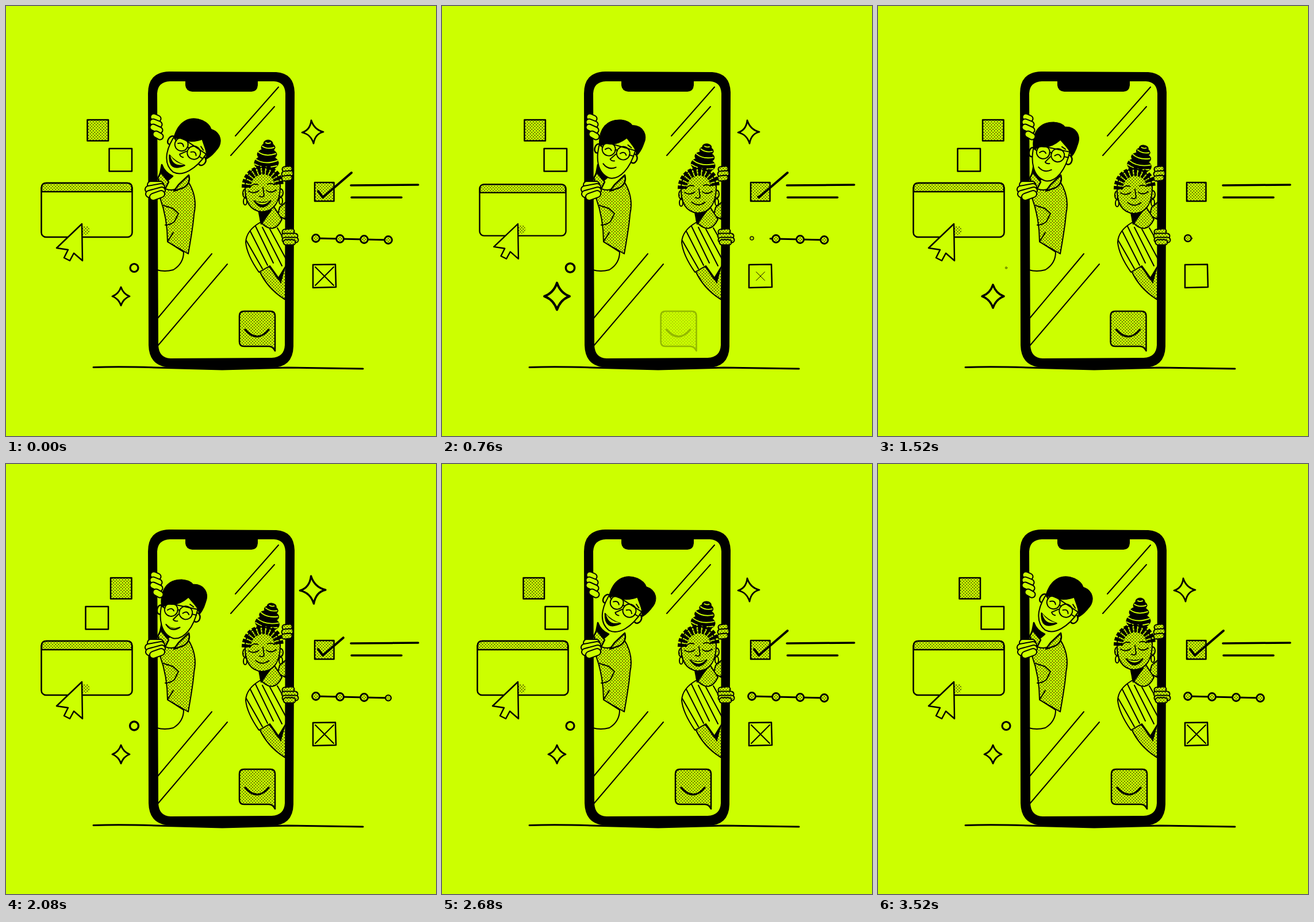
These frames come from a looping animation (748 by 748 pixels, 3.56 s). An HTML page:

```html
<!DOCTYPE html>
<html lang="en">
<head>
<meta charset="utf-8">
<title>Phone friends</title>
<style>
  html, body { margin: 0; height: 100%; overflow: hidden; background: #cf0; }
  svg { display: block; width: 100vw; height: 100vh; }
  .ink { fill: #cf0; stroke: #000; stroke-width: 2.5; stroke-linejoin: round; stroke-linecap: round; }
  .line { fill: none; }
  .solid { fill: #000; }
  .tone { fill: url(#dots); }
  .bare { stroke: none; }
</style>
</head>
<body>
<svg viewBox="0 0 748 748">
  <defs>
    <pattern id="dots" width="3.7" height="3.7" patternUnits="userSpaceOnUse" patternTransform="rotate(45)">
      <rect width="3.7" height="3.7" fill="#cf0"/>
      <circle cx="1.85" cy="1.85" r=".85"/>
    </pattern>
  </defs>
  <g class="ink">
    <!-- window, cursor and squares -->
    <g id="window">
      <rect x="61.5" y="308" width="158" height="94" rx="8"/>
      <path class="tone" d="M62 323V316Q62 308 70 308H211Q219 308 219 316V323Z"/>
      <path class="tone bare" d="M132 383H143L146 390L143 398H132Z"/>
    </g>
    <path id="cursor" d="M132 379L88 421L108 424L101 438L111 443L118 430L133 443Z"/>
    <rect id="tonedSquare" class="tone" x="141.5" y="198" width="36.5" height="36.5"/>
    <rect id="plainSquare" x="179.5" y="248" width="39.5" height="39.5"/>
    <circle id="ring" r="7" stroke-width="3.2"/>
    <path id="lowSpark" stroke-width="2.8" d="M0-16Q4-4 15 0Q4 4 0 16Q-4 4-15 0Q-4-4 0-16Z"/>
    <path id="highSpark" stroke-width="2.8" d="M-2-20Q3-4 19 0Q5 3 2 20Q-3 4-18 1Q-4-3-2-20Z"/>

    <!-- checklist, slider and crossed box -->
    <rect class="tone" x="537" y="307" width="33.5" height="32.5"/>
    <path id="check" class="line" pathLength="1" stroke-width="4" d="M543 322L551 333L601 290"/>
    <path class="line" stroke-width="3.5" d="M600 312L717 311M601 333H688"/>
    <path id="slider" class="line" pathLength="1" stroke-width="2.8" d="M539 404L665 407"/>
    <g id="knobs" stroke-width="2.8"></g>
    <path d="M534 450L573 449.5L574 489L534 490Z"/>
    <path id="cross" class="line" stroke-width="2" d="M-16-16L16 16M16-16L-16 16"/>

    <!-- screen -->
    <path class="line" stroke-width="2" d="M474 141L399 226M467 175L391 260M358 431L264 543M385 449L264 591"/>
    <g id="bubble">
      <path class="tone" d="M414 531H460Q468 531 468 539V600Q464 592 457 592H414Q406 592 406 584V539Q406 531 414 531Z"/>
      <path class="line" stroke-width="3.5" d="M416 563Q437 587 457 563"/>
    </g>

    <!-- man -->
    <path stroke-width="2" d="M281 410L309 428Q309 448 291 459Q276 463 262 459V338"/>
    <path class="tone" stroke-width="2" d="M274 316Q292 328 316 304Q334 332 327 362Q326 380 317 431L281 410Q281 370 268 334Z"/>
    <path class="line" stroke-width="2" d="M281 410L291 394M274 347L290 352L300 361L293 375Q286 381 277 381"/>
    <path class="bare" d="M274 276L276 314Q293 326 312 296Z"/>
    <path class="solid" d="M271 276Q276 290 290 296L276 308L268 292Z"/>
    <path class="tone" d="M269 289L264 300L275 322L283 306ZM292 322L300 311L318 294Q322 308 309 316Z"/>
    <g id="manHead">
      <ellipse cx="-32" cy="4" rx="5" ry="8"/>
      <ellipse cx="33" cy="4" rx="6" ry="8"/>
      <path stroke-width="2" d="M-31-10C-32 20-22 46 2 48C20 46 32 22 32-10Z"/>
      <path class="solid" stroke-width="1" d="M-31-3C-40-30-30-50-6-55Q8-57 15-51C34-56 46-42 43-25Q42-10 36-1Q35-10 24-18L12-27Q0-11-14-9Q-24-8-27-2Z"/>
      <path class="line" stroke-width="1.9" d="M-2-1Q0-4 2-1M24 0L32 0M-24 0L-29-2M-19 2Q-13-5-8 1M8 2Q14-5 19 2M1 5L-6 16Q-3 19 2 17M17-16L24-13"/>
      <circle class="line" stroke-width="1.9" cx="-13" r="11.5"/>
      <circle class="line" stroke-width="1.9" cx="13" r="11.5"/>
      <path id="manMouth" class="solid" stroke-width="2"/>
      <path id="manTeeth" class="bare"/>
    </g>

    <!-- woman -->
    <path class="tone" stroke-width="2" d="M476 350L488 340V368L470 374Z"/>
    <path class="tone" stroke-width="2" d="M441 461Q455 492 486 511L488 448L474 476L458 453Z"/>
    <path class="solid" stroke-width="1" d="M473 473L486 452L478 482Z"/>
    <path stroke-width="2" d="M443 376Q418 390 417 411Q419 433 440 463L459 452L474 473L488 450V372L478 367Q468 386 443 376Z"/>
    <path class="line" stroke-width="2" d="M434 383L465 447M425 392L455 451M418 408L446 457M446 385L480 452M459 388L487 440M472 386L488 414"/>
    <path class="tone" stroke-width="2" d="M441 350L443 376Q466 400 480 371L464 346Z"/>
    <path class="solid" d="M439 353Q448 360 461 355L444 379Z"/>
    <g id="womanHead">
      <g id="bun">
        <g class="solid" stroke-width="1">
          <ellipse cx="453" cy="273" rx="21" ry="13"/>
          <ellipse cx="454" cy="258" rx="17" ry="10"/>
          <ellipse cx="456" cy="246" rx="12" ry="8"/>
          <ellipse cx="456" cy="239" rx="8" ry="6"/>
        </g>
        <path class="line" style="stroke: #cf0" stroke-width="2" d="M435 267Q450 277 472 269M433 275Q449 284 471 278M439 254Q451 263 469 257M446 244Q455 250 466 246M452 238Q456 240 460 238"/>
      </g>
      <ellipse class="line" stroke-width="2" cx="416" cy="340" rx="3" ry="6"/>
      <ellipse class="line" stroke-width="2" cx="478" cy="339" rx="3" ry="6"/>
      <ellipse class="tone" stroke-width="2" cx="478" cy="325" rx="4" ry="7"/>
      <ellipse class="tone" stroke-width="2" cx="415" cy="326" rx="3" ry="7"/>
      <path class="tone" stroke-width="2" d="M416 312C415 340 424 356 445 358C468 357 477 338 477 312C475 270 417 270 416 312Z"/>
      <path class="line" stroke-width="16" stroke-linecap="butt" stroke-dasharray="5.2 2.4" d="M418 316C418 277 473 274 475 312"/>
      <path class="line" stroke-width="1.9" d="M422 322Q431 328 440 321M453 321Q461 327 470 320M426 313Q432 308 438 311M455 310Q462 307 467 311M447 316L449 330Q446 334 441 331"/>
      <path id="womanMouth" class="solid" stroke-width="2"/>
      <path id="womanTeeth" class="bare"/>
    </g>

    <!-- phone, ground and hands -->
    <path class="solid bare" fill-rule="evenodd" d="M284 114L470 115Q501 117 502 150L500 592Q499 629 462 629L376 632L285 629Q249 627 248 590L247 152Q247 115 284 114ZM285 131Q264 132 263 152L265 590Q266 612 286 613L462 612Q484 611 485 590L486 152Q485 132 466 131Z"/>
    <path class="solid bare" d="M312 129H438V138Q437 149 427 149H324Q313 148 312 138Z"/>
    <path class="line" stroke-width="3" d="M152 628.5Q200 627 262 629L376 632L490 629L621 631"/>
    <g id="hands"></g>
  </g>
</svg>
<script>
const LOOP = 3560;
const $ = id => document.getElementById(id);
const move = (id, transform) => $(id).setAttribute('transform', transform);
const ramp = (t, a, b) => Math.min(1, Math.max(0, (t - a) / (b - a)));
const ease = (t, a, b) => {
  const k = ramp(t, a, b);
  return k < .5 ? 4 * k ** 3 : 1 - 4 * (1 - k) ** 3;
};
// Shrinks to nothing, then grows again, with overshoot c on both ways.
const pop = (t, out0, out1, in0, in1, c) => {
  const k = t < in0 ? ramp(t, out0, out1) : 1 - ramp(t, in0, in1);
  return Math.max(0, 1 - (c + 1) * k ** 3 + c * k ** 2);
};
const place = (id, x, y, s) => move(id, `translate(${x} ${y}) scale(${s})`);
const scaleAt = (id, x, y, s) => move(id, `translate(${x} ${y}) scale(${s}) translate(${-x} ${-y})`);

function trim(id, a, b) {
  const style = $(id).style;
  style.visibility = b - a > .005 ? 'visible' : 'hidden';
  style.strokeDasharray = `${b - a} 2`;
  style.strokeDashoffset = -a;
}

function mouth(who, x, y, half, open) {
  const lip = y + 9 - 4 * open;
  const shape = (top, low, w) =>
    `M${x - w} ${y}Q${x} ${top} ${x + w} ${y}Q${x} ${low} ${x - w} ${y}Z`;
  const w = half * (.72 + .28 * open);
  $(who + 'Mouth').setAttribute('d', shape(lip, y + 9 + 17 * open, w));
  $(who + 'Teeth').setAttribute('d', shape(lip + open, lip + 9 * open, w - 2));
}

// Each finger is a thick stroke with a lighter one on top.
function fingers(list, width, colour) {
  $('hands').innerHTML += list.map(([x1, y1, x2, y2]) =>
    [['#000', width], [colour, width - 4]].map(([stroke, w]) =>
      `<path d="M${x1} ${y1}L${x2} ${y2}" stroke="${stroke}" stroke-width="${w}"/>`).join('')).join('');
}
fingers([[257, 193, 264, 196], [256, 202, 266, 206], [256, 211, 267, 216], [261, 223, 268, 227]], 13, '#cf0');
fingers([[252, 311, 268, 311], [248, 319, 270, 315], [249, 327, 271, 321], [256, 332, 270, 327]], 14, '#cf0');
fingers([[485, 284, 493, 283], [484, 292, 495, 291], [484, 300, 493, 299]], 11, 'url(#dots)');
fingers([[485, 393, 497, 392], [484, 400, 503, 400], [485, 407, 504, 407], [487, 411, 499, 411]], 11, 'url(#dots)');

$('knobs').innerHTML = [0, 1, 2, 3].map(i => `<circle id="knob${i}" class="tone" r="6.5"/>`).join('');

function draw(t) {
  const press = 1 - .05 * (ease(t, 620, 750) - ease(t, 800, 960));
  scaleAt('window', 140.5, 355, press);
  scaleAt('cursor', 132, 379, press);

  const swap = ease(t, 620, 1240) - ease(t, 2100, 2660);
  move('tonedSquare', `translate(${40.5 * swap})`);
  move('plainSquare', `translate(${-41 * swap})`);

  place('ring', 223, 455.5, pop(t, 620, 1000, 1480, 2280, 1.7));
  place('lowSpark', 200, 505, pop(t, 500, 1000, 1100, 1700, 4.6));
  place('highSpark', 533, 219, pop(t, 760, 1100, 1700, 2300, 3));
  place('cross', 554, 470, pop(t, 540, 790, 1650, 2000, 1.7));

  if (t < 1400) trim('check', ease(t, 640, 1000), 1);
  else trim('check', 0, ease(t, 1800, 2260));

  if (t < 1300) trim('slider', ramp(t, 700, 940), 1);
  else trim('slider', 0, ramp(t, 1490, 2060));
  for (let i = 0; i < 4; i++) {
    const out = 660 + i * 90, back = 1380 + i * 193;
    const s = 1 - ease(t, out, out + 200) + ease(t, back, back + 200);
    place('knob' + i, 539 + i * 42, 404 + i, s);
  }

  const away = ease(t, 560, 900) - ease(t, 1100, 1640);
  move('bubble', `translate(${-35 * away})`);
  $('bubble').setAttribute('opacity', 1 - away);

  const tilt = 1 - ease(t, 200, 1060) + ease(t, 2000, 2900);
  move('manHead', `translate(${300 + 16 * tilt} ${257 - 9 * tilt ** .4}) rotate(${12 + 22 * tilt})`);
  mouth('man', -4, 27, 16, 1 - ease(t, 200, 760) + ease(t, 1900, 2400));

  const lean = ease(t, 300, 1060) - ease(t, 2400, 3050);
  move('womanHead', `translate(0 ${3 * lean})`);
  move('bun', `translate(453 284) rotate(${9 * lean}) scale(1 ${1 - .1 * lean}) translate(-453 -284)`);
  mouth('woman', 446, 339, 16, .7 * (1 - ease(t, 250, 880) + ease(t, 2150, 2650)));
}

function tick() {
  draw(performance.now() % LOOP);
  requestAnimationFrame(tick);
}
tick();
</script>
</body>
</html>
```
